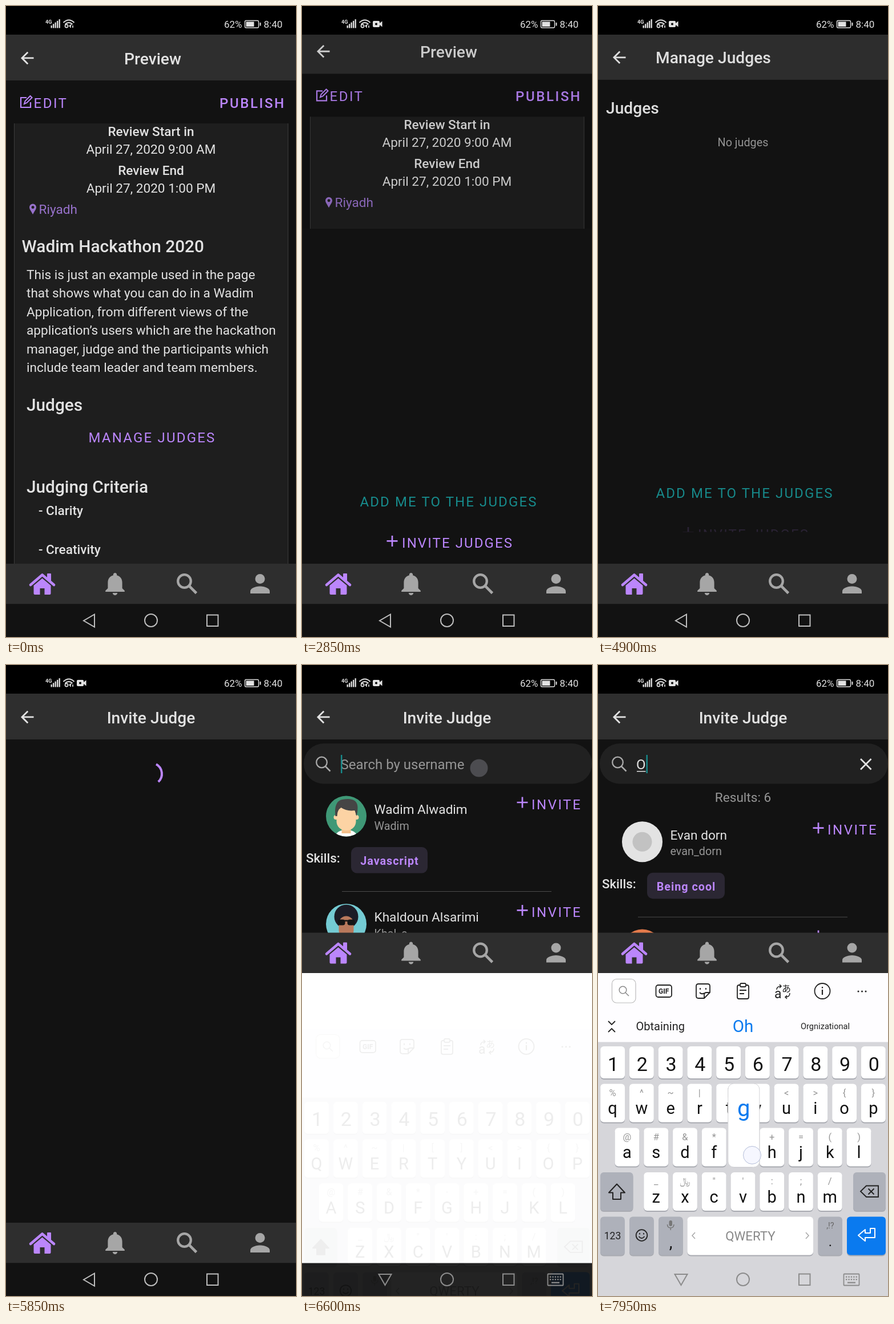
Recreate the animation shown at these times as an HTML page. Size 508 by 1102 pixels, loop 8 s.

```html
<!DOCTYPE html>
<html lang="en">
<head>
<meta charset="utf-8">
<title>Invite a judge</title>
<style>
html, body { margin: 0; width: 100%; height: 100%; overflow: hidden; background: #000; }
svg { display: block; width: 100%; height: 100%; }
text { font-family: Roboto, "Noto Sans CJK JP", "Noto Sans", sans-serif; white-space: pre; }
</style>
</head>
<body>
<svg id="stage" viewBox="0 0 508 1102" preserveAspectRatio="none"></svg>
<script>
const LOOP = 8000;
const TOP = 50, VIEW_H = 924;
const BG = '#121212', BAR = '#2e2e2e', INK = '#e2e2e2', DIM = '#969696';
const PURPLE = '#bb86fc', TEAL = '#178b8c', BLUE = '#0a7aef';

// ---------- markup helpers ----------
const esc = s => s.replace(/&/g, '&amp;').replace(/</g, '&lt;').replace(/>/g, '&gt;');
const text = (s, x, y, size, fill = INK, extra = '') =>
  `<text x="${x}" y="${y}" font-size="${size}" fill="${fill}" ${extra}>${esc(s)}</text>`;
const MID = 'text-anchor="middle"', MED = 'font-weight="500"', CMED = MID + ' ' + MED;
const rect = (x, y, w, h, fill, r = 0, extra = '') =>
  `<rect x="${x}" y="${y}" width="${w}" height="${h}" rx="${r}" fill="${fill}" ${extra}/>`;
const circle = (x, y, r, fill, extra = '') =>
  `<circle cx="${x}" cy="${y}" r="${r}" fill="${fill}" ${extra}/>`;
const line = (d, color, w = 2, extra = '') =>
  `<path d="${d}" fill="none" stroke="${color}" stroke-width="${w}" ${extra}/>`;
const shape = (d, fill, extra = '') => `<path d="${d}" fill="${fill}" ${extra}/>`;
const group = (id, body, extra = '') => `<g ${id ? `id="${id}"` : ''} ${extra}>${body}</g>`;
const move = (x, y, body) => group('', body, `transform="translate(${x} ${y})"`);
const caps = (s, x, y, fill, gap = 2.1, extra = '') =>
  text(s, x, y, 24, fill, `letter-spacing="${gap}" ${extra}`);
const plus = (x, y) => line(`M${x - 9.5} ${y}h19M${x} ${y - 9.5}v19`, PURPLE, 2.7);

const ARROW = 'M20 11H7.83l5.59-5.59L12 4l-8 8 8 8 1.41-1.41L7.83 13H20v-2z';
const header = title => rect(0, 50, 508, 80, BAR) +
  shape(ARROW, INK, 'transform="translate(20.3 74) scale(1.411)"') + title;
const screen = (id, body) =>
  `<clipPath id="${id}Clip"><rect id="${id}Cut" width="508" height="${VIEW_H}"/></clipPath>` +
  group(id, group(id + 'Body', rect(0, TOP, 508, VIEW_H, BG) + body +
    rect(0, TOP, 508, VIEW_H, '#000', 0, `id="${id}Shade" opacity="0"`)),
    `clip-path="url(#${id}Clip)"`);

// ---------- status bar ----------
function statusBar() {
  let s = rect(0, 0, 508, 50, '#000') + text('4G', 69, 31, 9, INK, 'font-weight="700"');
  for (let i = 0; i < 5; i++) s += rect(78.5 + i * 3.5, 34 - i * 2.7, 2.3, 4.5 + i * 2.7, INK);
  s += line('M100.5 29q9.5-9 19 0M103.5 32q6.500-6 13 0', INK, 2) +
    circle(106, 35, 2.6, 'none', `stroke="${INK}" stroke-width="1.6"`) +
    line('M110.500 35.500l4-3M113 38v-4M117 34v4', INK, 1.6);
  s += group('camera', rect(124, 26, 12, 11, INK, 2) + shape('M136 30l4.500-3.500v10l-4.500-3.500z', INK) +
    circle(130, 31.5, 2, '#000'));
  return s + text('62%', 382, 38, 17) + text('8:40', 451.5, 38, 17) +
    rect(418.5, 25.5, 24, 12.5, 'none', 2, `stroke="${INK}" stroke-width="1.4"`) +
    rect(420.5, 27.5, 14, 8.5, INK) + rect(444.5, 29, 2, 5.5, INK);
}

// ---------- screens ----------
function previewScreen() {
  const story = ['This is just an example used in the page',
    'that shows what you can do in a Wadim', 'Application, from different views of the',
    'application’s users which are the hackathon',
    'manager, judge and the participants which', 'include team leader and team members.'];
  return header(text('Preview', 257, 101.5, 28.2, INK, CMED)) +
    line('M36 160H26v17h17v-9', PURPLE, 2.2) +
    line('M32 171l1.500-5 9-9 3 3-9 9z', PURPLE, 2) +
    caps('EDIT', 48.5, 177.5, PURPLE, 2.5) + caps('PUBLISH', 374, 177.5, PURPLE, 2.6, MED) +
    rect(14, 205, 480.5, 780, '#1e1e1e') + line('M14.500 205v780M494 205v780', '#3c3c3c', 1) +
    text('Review Start in', 254, 226.5, 22.6, INK, CMED) +
    text('April 27, 2020 9:00 AM', 254, 257.5, 22.6, INK, MID) +
    text('Review End', 254, 295, 22.6, INK, CMED) +
    text('April 27, 2020 1:00 PM', 254, 326, 22.6, INK, MID) +
    shape('M47 364c-3-6-6-9-6-12.500a6 6 0 0 1 12 0c0 3.500-3 6.500-6 12.500zM47 349a2.500 2.500 0 1 0 .1 0z', '#9872cc') +
    text('Riyadh', 57.5, 363, 22.6, '#9872cc') +
    text('Wadim Hackathon 2020', 27.5, 430, 29.8, INK, MED) +
    story.map((s, i) => text(s, 36, 477 + i * 32.45, 22.6)).join('') +
    text('Judges', 36, 707, 29.8, INK, MED) +
    caps('MANAGE JUDGES', 144.5, 762, PURPLE, 2.2, 'id="manageBtn"') +
    text('Judging Criteria', 36, 850, 29.8, INK, MED) +
    text('- Clarity', 57, 889, 22.6, INK, MED) + text('- Creativity', 57, 957, 22.6, INK, MED);
}

function manageScreen() {
  return header(text('Manage Judges', 101, 101.5, 28.2, INK, MED)) +
    text('Judges', 14, 189, 28.2, INK, MED) +
    text('No judges', 254, 246, 19.75, DIM, MID) +
    caps('ADD ME TO THE JUDGES', 101.5, 860.5, TEAL) +
    group('inviteBtn', plus(158, 920.5) + caps('INVITE JUDGES', 175, 932, PURPLE));
}

const face = (bg, body) => circle(0, 0, 35.5, bg) + group('', body, 'clip-path="url(#round)"');
const FACES = {
  short: face('#3f9876', shape('M-21 40q2-16 21-16t21 16z', '#fff') + rect(-8, 14, 16, 16, '#f3c08c') +
    rect(-17, -18, 34, 43, '#fcd3a4', 16) + circle(-18, 2, 4, '#fcd3a4') + circle(18, 2, 4, '#fcd3a4') +
    shape('M-19 0q-3-26 12-29q26-5 27 13q0 10-2 16l-3-10q-14 2-24-5q-7 4-7 15z', '#454545')),
  curly: face('#74cbd3', circle(0, -13, 21, '#1c1c26') + shape('M-24 40q3-15 24-15t24 15z', '#eee') +
    rect(-13, -14, 26, 38, '#b9795c', 13) + rect(-15, -8, 13, 10, '#151515', 4) +
    rect(2, -8, 13, 10, '#151515', 4) + rect(-3, -7, 6, 2.5, '#151515')),
  plain: face('#e3e3e3', circle(0, 0, 17, '#c2c2c2')),
  orange: face('#e37a4b', '')
};

function row(y, face, name = '', handle = '', skill = '', chip = 134) {
  let s = move(77.5, 264, FACES[face]) + text(name, 126.5, 260, 22.6) +
    text(handle, 126.5, 287.5, 19.75, DIM) + plus(386, 240) + caps('INVITE', 402, 251.5, PURPLE, 2.5);
  if (skill) s += text('Skills:', 7, 345, 22.3, INK, MED) + rect(86, 318, chip, 45.5, '#2b2733', 10) +
    text(skill, 86 + chip / 2 + .5, 349, 19.75, PURPLE, 'text-anchor="middle" font-weight="700" letter-spacing="1"') +
    rect(70, 395, 367, 1, '#4b4b4b');
  return move(0, y, s);
}

function inviteScreen() {
  const search = rect(3, 137, 505, 70.5, '#212121', 35) +
    circle(34.5, 170, 9.3, 'none', 'stroke="#aaa" stroke-width="2.3"') + line('M41 177l8.500 8.500', '#aaa', 2.5) +
    text('Search by username', 67.5, 182, 24, DIM, 'id="hint"') +
    group('typed', text('O', 67, 182, 24) + rect(68, 185, 15.5, 1.5, INK) +
      line('M460 164l18.500 18.500m0-18.500l-18.500 18.500', INK, 2.8)) +
    rect(68, 157, 2.4, 32, TEAL, 0, 'id="caret"');
  return header(text('Invite Judge', 254, 101.5, 28.2, INK, CMED)) +
    line('', PURPLE, 4, 'id="spinner"') +
    group('list', search +
      group('everyone', row(0, 'short', 'Wadim Alwadim', 'Wadim', 'Javascript') +
        row(188.4, 'curly', 'Khaldoun Alsarimi', 'Khal_s')) +
      group('found', text('Results: 6', 254, 239, 22.6, DIM, MID) +
        row(44.7, 'plain', 'Evan dorn', 'evan_dorn', 'Being cool', 136) + row(233.1, 'orange')));
}

// ---------- tabs and system navigation ----------
function tabs() {
  const grey = '#a6a6a6';
  return rect(0, 974, 508, 70.5, BAR) +
    line('M43 1011l20.500-17.500 20.500 17.500', PURPLE, 4.6, 'stroke-linecap="round" stroke-linejoin="round"') +
    rect(72, 991, 7, 13, PURPLE, 1) +
    shape('M48.500 1012l15-12.500 15 12.500v14q0 2-2 2h-9v-11h-8v11h-9q-2 0-2-2z', PURPLE) +
    shape('M12 22c1.100 0 2-.9 2-2h-4c0 1.100.89 2 2 2zm6-6v-5c0-3.070-1.640-5.640-4.500-6.320V4c0-.83-.67-1.500-1.500-1.500s-1.500.67-1.500 1.500v.68C7.630 5.360 6 7.920 6 11v5l-2 2v1h16v-1l-2-2z',
      grey, 'transform="translate(165.800 985) scale(2.100 2)"') +
    circle(312.5, 1004.5, 11.3, 'none', `stroke="${grey}" stroke-width="4.3"`) +
    line('M320.500 1012.500l13 13', grey, 4.6) +
    circle(445, 1000.5, 8.5, grey) + shape('M428 1026v-4c0-6 11-8.500 17-8.500s17 2.500 17 8.500v4z', grey);
}

function navIcons() {
  let keys = '';
  for (let i = 0; i < 10; i++) keys += rect(434 + i % 5 * 4.4, 1067.5 + (i / 5 | 0) * 4.5, 2.3, 2.3, 'currentColor');
  return group('nav', line('M155 1062.500v22l-19-11z', 'currentColor', 2, 'id="backMark"') +
    circle(254, 1073, 11, 'none', 'stroke="currentColor" stroke-width="2"') +
    rect(352, 1063.5, 19.5, 19.5, 'none', 0, 'stroke="currentColor" stroke-width="2"') +
    group('switcher', rect(430.5, 1063.5, 27, 20, 'none', 1, 'stroke="currentColor" stroke-width="1.800"') +
      keys + rect(437, 1077.5, 14, 2.3, 'currentColor')));
}

// ---------- keyboard ----------
const PITCH = 50.75;
const key = (x, y, w, h, fill = '#fff') => rect(x, y + 2, w, h, '#a9abb2', 6) + rect(x, y, w, h, fill, 6);

function letterRow(letters, marks, x0, y, upper) {
  return [...letters].map((c, i) => {
    const x = x0 + i * PITCH;
    return key(x - 21.4, y, 42.8, 67) + text([...marks][i], x, y + 21, 16.5, '#959595', MID) +
      text(upper ? c.toUpperCase() : c, x, y + 52.5, 29, '#111', MID);
  }).join('');
}

const letters = upper =>
  letterRow('qwertyuiop', '%^~|[]<>{}', 25.6, 731.5, upper) +
  letterRow('asdfghjkl', '@#&*-+=()', 51, 808.5, upper) +
  letterRow('zxcvbnm', '_﷼"\':;/', 101.7, 886, upper);

function toolbar() {
  const ink = '#222', o = `stroke="${ink}" stroke-width="1.8"`;
  return rect(24.5, 548.5, 41.5, 41.5, '#fff', 8, 'stroke="#bbb" stroke-width="1.2"') +
    circle(43.5, 567.5, 6.3, 'none', 'stroke="#888" stroke-width="1.5"') + line('M48 572l6 6', '#888', 1.5) +
    rect(101.5, 559, 27.5, 21, 'none', 4, o) + text('GIF', 115.2, 574, 12, ink, 'text-anchor="middle" font-weight="700"') +
    line('M176 557h16q4 0 4 4v11l-10 10h-10q-4 0-4-4v-17q0-4 4-4zM196 572h-6q-4 0-4 4v6M179 564v3M189 564v3M178 572q4 4 8 1', ink, 1.8) +
    rect(244, 559, 20, 24, 'none', 3, o) + rect(249, 556, 10, 6, '#fff', 2, o) + line('M248 568h12M248 574h8', ink, 1.8) +
    text('a', 309, 582, 23, ink) + text('あ', 322, 571, 16, ink) +
    line('M313 567q0-6 8-6m-3-3l3 3-3 3M336 573q0 7-8 7m3-3l-3 3 3 3', ink, 1.5) +
    circle(393, 569.5, 13.5, 'none', o) + line('M393 567v9M393 562v2.500', ink, 2.2) +
    [456, 462.5, 469].map(x => circle(x, 570, 1.5, ink)).join('');
}

function keyboard() {
  let s = rect(0, 538, 508, 121, '#fefdff') + rect(0, 658.5, 508, 560, '#d6d6da') + toolbar();
  s += group('words', line('M18 622l6 6 6-6M18 641l6-6 6 6', '#222', 1.8) + text('Obtaining', 66.5, 638, 20, '#222') +
    text('Oh', 254, 641, 29.5, BLUE, MID) + text('Orgnizational', 355, 636, 14.6, '#222'));
  [...'1234567890'].forEach((d, i) => {
    const x = 25.6 + i * PITCH;
    s += key(x - 21.4, 666, 42.8, 56) + text(d, x + 1, 708.5, 34, '#111', MID);
  });
  s += group('upper', letters(true)) + group('lower', letters(false));
  const dark = '#aeb1ba';
  s += key(4, 886, 57.5, 67, dark) + key(447, 886, 57, 67, dark) +
    line('M33 906.500l14 15h-7v11.500h-14v-11.500h-7z', '#222', 2, 'id="shift" stroke-linejoin="round"') +
    line('M470 909.500h21v19.500h-21l-10-9.750zM473.500 914.500l10 10m0-10l-10 10', '#222', 1.9);
  s += key(4, 963.5, 42.8, 67, dark) + key(55, 963.5, 42.8, 67, dark) + key(106, 963.5, 42.8, 67, dark) +
    key(156.5, 963.5, 220.5, 67) + key(385.5, 963.5, 42.5, 67, dark) + key(436, 963.5, 68, 67, BLUE) +
    text('123', 25.5, 1003, 17.5, '#222', MID) +
    circle(76.5, 996, 9.8, 'none', 'stroke="#222" stroke-width="1.8"') +
    line('M71.500 998q5 6 10 0M73 992v2.500M80 992v2.500', '#222', 1.8) +
    rect(124.5, 970, 5.5, 10, '#777', 2.7) + line('M121.500 977q0 6 5.700 6t5.700-6M127.200 983v4', '#777', 1.5) +
    text(',', 127.5, 1018, 29, '#111', MID) +
    text('QWERTY', 267, 1004.5, 22.3, '#888', MID) +
    line('M170 991l-5 5.500 5 5.500M364 991l5 5.500-5 5.500', '#aaa', 1.6) +
    text(',!?', 407, 984, 14.5, '#666', MID) + text('.', 407, 1015, 24, '#111', MID) +
    line('M485 984v16h-17v6l-12-10 12-10v6h9v-8z', '#fff', 2, 'stroke-linejoin="round"');
  return s + group('bubble', rect(-27.5, 0, 55, 146, '#fff', 10, 'stroke="#d4d4d8" stroke-width="1"') +
    text('', 0, 57, 40, BLUE, MID + ' id="bubbleText"'));
}

// ---------- assembly ----------
document.getElementById('stage').innerHTML =
  '<clipPath id="round"><circle r="35.5"/></clipPath>' + rect(0, 0, 508, 1102, BG) +
  screen('preview', previewScreen()) + screen('manage', manageScreen()) + screen('invite', inviteScreen()) +
  rect(0, 538, 508, 507, '#fff', 0, 'id="blank"') + group('tabs', tabs()) +
  rect(0, 1044.5, 508, 58, BG) + group('ime', keyboard()) + navIcons() + statusBar() +
  circle(0, 0, 15.5, '#8a8a96', 'id="touch"');

const el = {};
document.querySelectorAll('[id]').forEach(n => el[n.id] = n);
const set = (id, name, value) => el[id].setAttribute(name, value);
const show = (id, on) => set(id, 'visibility', on ? 'inherit' : 'hidden');
const clamp = x => Math.min(1, Math.max(0, x));

function bezier(x1, y1, x2, y2) {
  const at = (s, a, b) => 3 * (1 - s) * (1 - s) * s * a + 3 * (1 - s) * s * s * b + s * s * s;
  return x => {
    if (x <= 0 || x >= 1) return clamp(x);
    let lo = 0, hi = 1;
    for (let i = 0; i < 24; i++) {
      const m = (lo + hi) / 2;
      if (at(m, x1, x2) < x) lo = m; else hi = m;
    }
    return at(lo, y1, y2);
  };
}
const pushEase = bezier(.35, .45, 0, 1), spinEase = bezier(.4, 0, .2, 1);
const push = (t, start) => pushEase((t - start) / 425);

// A new screen is uncovered from the bottom while the old one drifts up and darkens.
function place(id, enter, leave) {
  show(id, enter > 0 && leave < 1);
  set(id + 'Cut', 'y', TOP + VIEW_H * (1 - enter));
  set(id + 'Body', 'transform', `translate(0 ${VIEW_H * (.041 * (1 - enter) - .02 * leave)})`);
  set(id + 'Shade', 'opacity', Math.min(.1, leave / 3.6));
}

function spin(t) {
  const ms = Math.max(0, t - 4924), u = ms / 1333 % 1;
  const tail = .75 * spinEase(u * 2 - 1), head = .75 * spinEase(u * 2);
  const angle = f => ((f + u * .25) * 360 + ms * 720 / 4444 - 75) * Math.PI / 180;
  const a = angle(tail), b = angle(Math.max(head, tail + .03));
  const pt = r => `${254 + 19 * Math.cos(r)} ${190 + 19 * Math.sin(r)}`;
  set('spinner', 'd', `M${pt(a)}A19 19 0 ${b - a > Math.PI ? 1 : 0} 1 ${pt(b)}`);
}

const TOUCHES = [
  { from: 6400, to: 6650, x: 310, y: 180, look: ['#77777f', .5, 'none'] },
  { from: 7450, to: 7600, x: 436, y: 779, look: ['#f4f5ff', .8, '#b4bdd8'], letter: 'O', bx: 432.3, by: 654 },
  { from: 7900, to: LOOP, x: 270, y: 856, look: ['#f4f5ff', .8, '#b4bdd8'], letter: 'g', bx: 255.3, by: 731 }
];

function draw(t) {
  const first = push(t, 2748), second = push(t, 4883);
  place('preview', 1, first);
  place('manage', first, second);
  place('invite', second, 0);
  set('manageBtn', 'opacity', 1 - .85 * clamp((t - 2590) / 150));
  set('inviteBtn', 'opacity', 1 - .85 * clamp((t - 4690) / 150));
  show('camera', t >= 50);

  const loaded = t >= 6150, open = t >= 6550, typed = t >= 7600, found = t >= 7700;
  spin(t);
  show('spinner', !loaded);
  show('list', loaded);
  show('hint', !typed);
  show('typed', typed);
  show('everyone', !found);
  show('found', found);
  show('caret', open && (typed || (t - 6550) % 1000 < 500));
  set('caret', 'x', typed ? 84.5 : 68);

  const rise = clamp((t - 6580) / 300);
  show('blank', open);
  set('tabs', 'transform', `translate(0 ${open ? -506.5 : 0})`);
  set('ime', 'opacity', rise);
  set('ime', 'transform', `translate(0 ${112 * (1 - rise) ** 2})`);
  show('ime', open);
  show('upper', !typed);
  show('lower', typed);
  show('words', typed);
  set('shift', 'fill', typed ? 'none' : '#222');
  set('nav', 'color', open ? '#8c8c8c' : '#bdbdbd');
  set('backMark', 'transform', open ? 'rotate(-90 145.5 1073.5)' : '');
  show('switcher', open);

  const touch = TOUCHES.find(p => t >= p.from && t < p.to);
  show('touch', !!touch);
  show('bubble', !!(touch && touch.letter));
  if (!touch) return;
  set('touch', 'cx', touch.x);
  set('touch', 'cy', touch.y);
  ['fill', 'fill-opacity', 'stroke'].forEach((name, i) => set('touch', name, touch.look[i]));
  if (touch.letter) {
    el.bubbleText.textContent = touch.letter;
    set('bubble', 'transform', `translate(${touch.bx} ${touch.by})`);
  }
}

const start = performance.now();
function tick() {
  draw((performance.now() - start) % LOOP);
  requestAnimationFrame(tick);
}
tick();
</script>
</body>
</html>
```
